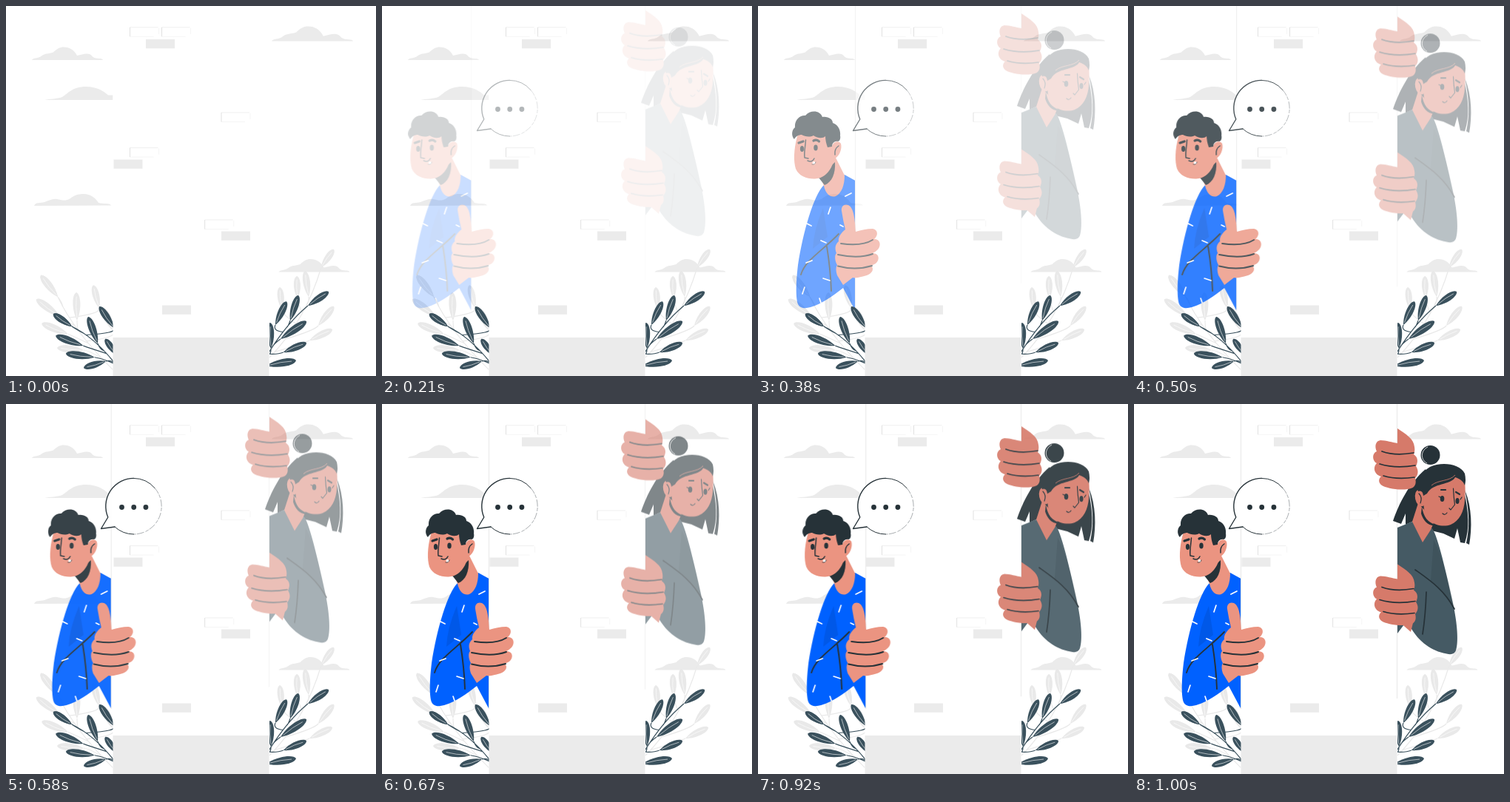
Animation, 500 px wide and 500 px high, one loop 1040 ms. Source, as an HTML page:

```html
<!DOCTYPE html>
<html lang="en">
<head>
<meta charset="utf-8">
<title>Peeking round the wall</title>
<style>
  html, body { margin: 0; width: 100%; height: 100%; overflow: hidden; background: #fff; }
  svg { display: block; width: 100vw; height: 100vh; }
  .line { fill: none; stroke: #263238; stroke-linecap: round; stroke-linejoin: round; }
  .ink { fill: #263238; }
  .pale { fill: #ebebeb; }
  .edge { stroke: #e2e2e2; stroke-width: .8; }
  .manSkin { fill: #eb9481; }
  .womanSkin { fill: #d67a6a; }
</style>
</head>
<body>
<svg viewBox="0 0 500 500">
  <defs>
    <path id="cloud" d="M0 17.5C2 14 8 16 13 12C18 8 22 9.500 29 7C35 1 39 0 43 0C51 0 57 4 61 11.500C69 10 77 6 82 13C87 17 95 14 96 17.500Z"/>
    <g id="grip">
      <path class="womanSkin" d="M356 33C368 41 378 47 379 58Q380 64 378 68C384 72 384 78 381 84C385 90 384 96 380 100C382 108 380 114 370 115C355 117 340 113 335 110C329 106 331 100 334 98C325 96 322 86 328 80C322 77 321 67 328 64C325 58 326 50 333 49C341 49 349 52 356 53Z"/>
      <path class="line" stroke-width="1.7" d="M335 64C346 68 361 69 378 66M332 81C345 85 362 86 380 83M337 97C350 101 365 101 379 99"/>
    </g>
    <clipPath id="leftSide"><path d="M0 0H144.500V500H0Z"/></clipPath>
    <clipPath id="rightSide"><path d="M356 -60H500V500H356Z"/></clipPath>
  </defs>

  <g class="pale">
    <use href="#cloud" x="35" y="55.5"/>
    <path d="M52 127C60 125 68 126 76 123C84 118 90 109 108 109C124 109 133 116 138 120.500H144.500V127Z"/>
    <path d="M38 270C40 265 45 266.500 52 265C58 263 63 260 69 261C75 262 80 264.500 87 260C92 256 97 254 105 254C114 254 121 259 125 266C131 268 140 265.500 142 269.500Z"/>
    <use href="#cloud" transform="translate(359 27.5) scale(1.146)"/>
    <use href="#cloud" x="368.5" y="342"/>
  </g>
  <g id="paleLeft" clip-path="url(#leftSide)"></g>
  <g id="paleRight" clip-path="url(#rightSide)"></g>
  <path fill="#fff" d="M144.500 0H355.500V500H144.500Z"/>

  <g id="man">
    <g clip-path="url(#leftSide)">
      <path fill="#0061ff" d="M102 242C88 256 74 305 67 350C64 375 64 395 67 403C70 409 77 409 84 407C100 402 114 392 128 381L144.500 412V236L130 228Z"/>
      <path fill="#0058e8" d="M101 273Q88 303 87 328L107 312Z"/>
      <path class="line" stroke-width="1.9" d="M71 363C77 343 100 331 122 308M106 325Q111 356 112 385"/>
      <path fill="none" stroke="#fff" stroke-width="1.7" stroke-linecap="round" d="M79 294l6 3M98 317l7 3M108 281l3 -9M131 257l8 -4M124 296l4 2M78 347l8 -3M101 368l9 3M73 389l3 -9M96 395l2 6"/>
      <path class="manSkin" d="M96 228L102 243C105 256 112 259 118 257C126 253 130 242 130 229L117 203Z"/>
      <path class="ink" d="M95 232L117 211C118 226 113 238 103 242Z"/>
      <path class="manSkin" d="M66 176C61 195 61 210 64 220C68 230 80 234 90 233.500C100 233 107 227 112 218L117 206C123 203 127 193 125 186C122 181 115 183 113 189L110 170L70 167Z"/>
      <path class="ink" d="M62 180C58 176 58 168 63 164C62 154 70 147 77 148C84 140 97 141 100 150C108 149 114 153 114 158C121 160 125 168 124 175C125 180 123 183 121 183C117 182 113 185 113 190L107 191C105 186 104 180 104 176C100 180 92 178 88 175C82 178 76 176 72 174C68 174 64 176 62 180Z"/>
      <ellipse class="ink" cx="72.500" cy="193" rx="2.600" ry="4"/>
      <ellipse class="ink" cx="91" cy="191.500" rx="2.700" ry="4"/>
      <path class="line" stroke-width="3.200" d="M68 185L74 183M88 182Q92 180 95.500 183"/>
      <path class="line" stroke-width="1.500" d="M77.500 181C77 190 75 198 76 205L81 206M80 209Q86 212 89 206M117 201Q116 193 122 189"/>
      <circle cx="88.500" cy="212" r="2" fill="#fff"/>
      <path class="line" stroke-width=".8" d="M86 214Q90 215 91 211"/>
    </g>
    <path fill="#fff" d="M144.500 0H205V412H144.500Z"/>
    <path class="edge" d="M144.500 0V412"/>
    <path class="manSkin" d="M126 277C125 270 130 267 135 269C143 273 144 290 145 305C152 303 160 301 168 301C175 302 176 310 170 315C178 315 180 323 175 329Q171 333 168 334C177 334 178 343 172 348L166 351C170 355 168 361 160 364C150 367 143 368 141 367L128 377L120 364Q117 355 120 350C117 345 116 337 119 334C116 326 118 322 122 318C121 312 126 306 131 302Q128 290 126 277Z"/>
    <path class="line" stroke-width="1.900" d="M125 321C140 323 157 323 168 316M121 336C140 340 157 339 168 335M121 351.500C138 356 154 355 167 351"/>
  </g>

  <g id="woman">
    <path class="edge" d="M355.500 -5V398"/>
    <path class="ink" d="M394 88C371 108 358 135 350 158L361 162L367 148V163L378 158L394 145Z"/>
    <path class="ink" d="M400 150L402 171L418 175L433 182L437 168L441 187L447 188C454 168 452 145 446 118Z"/>
    <path class="ink" d="M447 116C457 140 457 168 453 190L449 188C454 165 453 145 447 116Z"/>
    <g clip-path="url(#rightSide)">
      <path fill="#455a64" d="M356 167L376 159L403 168C411 180 422 228 432 274C438 304 438 324 435 333Q433 339 425 338C406 335 388 325 375 304L368 294L356 310Z"/>
      <path fill="#263238" opacity=".18" d="M405 184C417 204 430 258 433 278C425 261 414 247 401 239Z"/>
      <path class="line" stroke-width="1.700" d="M380 224C401 239 419 251 433 277M395 254Q394 285 390 311"/>
      <path class="womanSkin" d="M384 134L376 159L390 187L401 170L406 158Z"/>
      <path class="ink" d="M389 138C391 153 397 160 409 164C398 166 391 158 388 148Z"/>
      <ellipse class="womanSkin" cx="387" cy="127" rx="7" ry="11.500" transform="rotate(-12 387 127)"/>
      <path class="womanSkin" d="M392 116C390 135 391 150 400 158C408 165 420 166 428 163C440 158 446 145 447 130C448 118 448 108 446 101L425 95Z"/>
      <path class="ink" d="M384 118C379 105 388 92 400 85C415 78 440 80 447 94Q449 103 447 110C445 104 440 101 434 99C428 110 404 106 396 121L391 124Q390 116 384 118Z"/>
      <path fill="none" stroke="#d67a6a" stroke-width=".8" d="M402 110C411 102 426 105 434 96"/>
      <circle class="ink" cx="400.500" cy="69" r="13"/>
      <path fill="none" stroke="#fff" stroke-width=".8" d="M397 58C386 64 388 76 396 80"/>
      <ellipse class="ink" cx="416.500" cy="128" rx="2.800" ry="4"/>
      <ellipse class="ink" cx="437" cy="131" rx="2.500" ry="4"/>
      <path class="line" stroke-width="2.200" d="M415 116L421 116M435 119L440 122"/>
      <path class="line" stroke-width="1.200" d="M431.500 114Q432 126 433.500 136L428 143L426 141M417 148Q420 151 423 147M412 125L416 127M441 129L443 126M385 121Q390 126 387 134"/>
    </g>
    <path class="womanSkin" d="M357 293L374 308L381 280Z"/>
    <use href="#grip"/>
    <use href="#grip" y="183.500"/>
  </g>

  <g id="bricks"></g>
  <path class="pale" d="M144.500 448H355.500V500H144.500Z"/>
  <g id="darkLeft" clip-path="url(#leftSide)"></g>
  <g id="darkRight" clip-path="url(#rightSide)"></g>

  <g id="bubble">
    <path fill="#fff" d="M137.500 153L128.500 168.500L147 166A37.800 37.800 0 1 0 137.500 153Z"/>
    <path class="line" stroke-width="1.400" d="M172.500 100.400A37.800 37.800 0 0 0 137.800 153L128.500 168.500L147 166"/>
    <path class="line" stroke-width="1" d="M172.500 100.400A37.800 37.800 0 0 1 201 113.500M147 166A37.800 37.800 0 0 0 172.500 176"/>
    <path class="line" stroke-width=".4" stroke-dasharray="9 2 4 3" d="M201 113.500A37.800 37.800 0 0 1 172.500 176"/>
    <path class="line" stroke-width="6.800" d="M156.500 139.500h.01m16.200 0h.01m16.200 0h.01"/>
  </g>
</svg>
<script>
const $ = id => document.getElementById(id);

// Point at t on the quadratic curve a, b, c.
const quad = ([a, b, c], t) =>
  [0, 1].map(i => a[i] * (1 - t) ** 2 + 2 * b[i] * t * (1 - t) + c[i] * t * t);

function leaf(tip, base, color) {
  const [dx, dy] = [base[0] - tip[0], base[1] - tip[1]];
  const fat = .08 + 3 / Math.hypot(dx, dy);
  const at = (f, side) => [tip[0] + dx * f - dy * side * fat, tip[1] + dy * f + dx * side * fat];
  return `<path fill="${color}" d="M${tip}C${at(.06, 1)} ${at(.6, 1.2)} ${base}C${at(.6, -1.2)} ${at(.06, -1)} ${tip}Z"/>
    <path fill="none" stroke="#fff" stroke-width=".6" d="M${at(.15, 0)}Q${at(.5, .3)} ${at(.9, 0)}"/>`;
}

// A stalk runs from its top leaf to the root; rows of leaves hang between a curve of tips
// and a curve of bases, each with a twig that joins the stalk a little lower down.
function plant(id, color, top, stalk, rows) {
  const [head, , root] = stalk;
  let twigs = `M${stalk[0]}Q${stalk[1]} ${root}`, leaves = leaf(top, head, color);
  for (const { n, tips, bases } of rows) {
    for (let i = 0; i < n; i++) {
      const tip = quad(tips, i / (n - 1)), base = quad(bases, i / (n - 1));
      const down = (base[1] + 14 - head[1]) / (root[1] - head[1]);
      const bend = base.map((v, k) => v + (v - tip[k]) * .25);
      twigs += `M${base}Q${bend} ${quad(stalk, Math.min(1, down))}`;
      leaves += leaf(tip, base, color);
    }
  }
  $(id).innerHTML = `<path fill="none" stroke="${color}" stroke-width="1.2" d="${twigs}"/>${leaves}`;
}

const DARK = '#3a515d', PALE = '#e9e9e9';
plant('paleLeft', PALE, [47, 364], [[70, 393], [92, 440], [145, 492]], [
  { n: 4, tips: [[47, 364], [28, 412], [69, 462]], bases: [[70, 393], [66, 434], [105, 465]] },
  { n: 3, tips: [[95, 387], [123, 357], [131, 408]], bases: [[96, 425], [131, 384], [146, 440]] }]);
plant('paleRight', PALE, [443, 329], [[426, 353], [405, 425], [356, 475]], [
  { n: 3, tips: [[404, 358], [399, 361], [370, 380]], bases: [[409, 393], [397, 389], [373, 410]] },
  { n: 2, tips: [[443, 406], [442, 422], [441, 437]], bases: [[422, 432], [416, 442], [410, 452]] }]);
plant('darkLeft', DARK, [64, 416], [[89, 433], [120, 448], [148, 484]], [
  { n: 4, tips: [[64, 416], [61, 464], [105, 489]], bases: [[89, 433], [112, 480], [135, 480]] },
  { n: 3, tips: [[111, 420], [130, 377], [134, 450]], bases: [[124, 456], [155, 406], [150, 472]] }]);
plant('darkRight', DARK, [436, 386], [[408, 405], [380, 428], [354, 470]], [
  { n: 3, tips: [[406, 426], [413, 458], [392, 479]], bases: [[371, 450], [388, 468], [352, 486]] },
  { n: 3, tips: [[395, 391], [382, 389], [357, 428]], bases: [[384, 425], [357, 418], [358, 463]] }]);

const solid = [[189, 45], [145.5, 207.5], [291, 304.5], [211, 404.5]];
const hollow = [[167.5, 28.8], [210.5, 28.8], [291, 144], [167.5, 191.6], [268.7, 289]];
$('bricks').innerHTML =
  solid.map(([x, y]) => `<rect class="pale" x="${x}" y="${y}" width="39" height="12.3"/>`).join('') +
  hollow.map(([x, y]) => `<g fill="none" stroke="#dedede" transform="translate(${x} ${y})">
    <path d="M0 12.500V0" stroke-width=".9"/><path d="M0 0H38" stroke-width=".5"/>
    <path d="M0 12.500H32M39 1V9" stroke-width=".3"/></g>`).join('');

// Each part fades in from a shifted place; the clock below sets its time.
function enter(id, shift, duration, easing) {
  const motion = $(id).animate([
    { opacity: 0, transform: `translate(${shift})` },
    { opacity: 1, transform: 'translate(0px, 0px)' }
  ], { duration, easing, fill: 'both' });
  motion.pause();
  return motion;
}
const motions = [
  enter('man', '-30px, 0px', 1000, 'cubic-bezier(.3, 0, .45, 1.35)'),
  enter('woman', '0px, -30px', 1000, 'cubic-bezier(.35, .05, .7, .68)'),
  enter('bubble', '0px, 0px', 600, 'linear')
];

// 25 pictures per loop, each shown from the nearest 10 ms.
const LOOP = 1040, TICK = 1000 / 24;
const start = performance.now();
function loop() {
  const t = Math.floor((performance.now() - start) % LOOP / 10) * 10;
  const time = Math.floor((t + 4.9) / TICK) * TICK;
  for (const motion of motions) motion.currentTime = time;
  requestAnimationFrame(loop);
}
loop();
</script>
</body>
</html>
```
